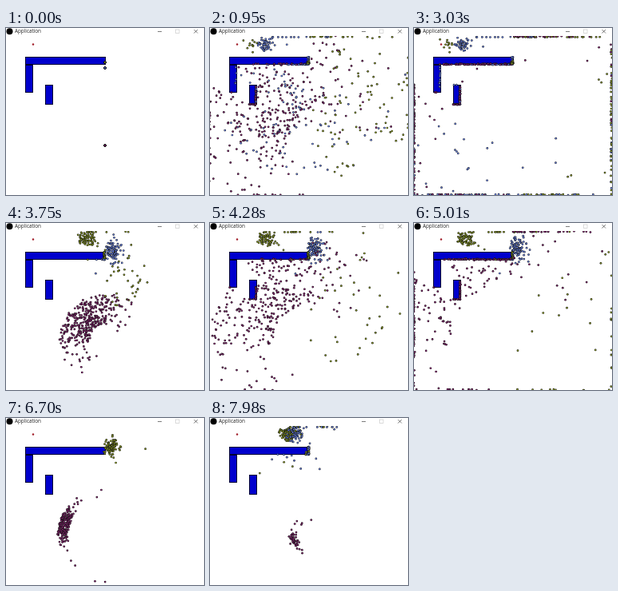
These frames come from a looping animation (248 by 209 pixels, 8000 ms). An HTML page with a canvas:

```html
<!DOCTYPE html>
<html lang="en">
<head>
<meta charset="utf-8">
<title>Application</title>
<style>
  html, body { margin: 0; width: 100%; height: 100%; overflow: hidden; background: #fff; }
  canvas { display: block; }
</style>
</head>
<body>
<canvas id="stage" width="248" height="209"></canvas>
<script>
const ctx = document.getElementById('stage').getContext('2d');
const WIDTH = 248, HEIGHT = 209, LOOP = 8000, TICK = 48, SUBSTEP = 12;
const WALLS = [[24, 36, 101, 10], [24, 46, 10, 35], [49, 71, 10, 25]];
const GOAL = [34, 20];
const PURPLE = { color: '#85246f', spawn: [124, 147] };
const OLIVE = { color: '#8a9a25', spawn: [124, 43] };
const BLUE = { color: '#6c86e8', spawn: [124, 50] };

let seed = 20;
function random() {
  seed = (seed * 1664525 + 1013904223) % 4294967296;
  return seed / 4294967296;
}
const gauss = () => Math.sqrt(-2 * Math.log(1 - random())) * Math.cos(2 * Math.PI * random());
// A few dots stray much further than the rest.
const stray = () => random() < 0.14 ? 3.5 : 1;
const dots = [];

function blocked([x, y]) {
  return x < 0.5 || x > WIDTH - 1.5 || y < 11.5 || y > HEIGHT - 1 ||
    WALLS.some(([wx, wy, w, h]) => x > wx && x < wx + w - 1 && y > wy && y < wy + h);
}

// Adds one dot that sways along its path until it hits something.
function addDot(color, start, end, path) {
  const phase = random() * 2 * Math.PI, rate = 0.004 + random() * 0.006;
  const position = age => {
    const [x, y] = path(age);
    const sway = Math.min(age / 300, 1.5);
    return [x + sway * Math.sin(age * rate + phase), y + sway * Math.cos(age * rate * 1.3 + phase)];
  };
  let stop = SUBSTEP;
  while (stop < end - start && !blocked(position(stop))) stop += SUBSTEP;
  dots.push({ color, start, end, order: random(), at: age => position(Math.min(age, stop)) });
}

// Dots fan out from the spawn around a heading; a narrow fan keeps together.
function scatter({ color, spawn: [x, y] }, { start, end }, count, heading, fan, speed) {
  for (let i = 0; i < count; i++) {
    const angle = heading + gauss() * fan * (fan < 0.5 ? stray() : 1);
    const pace = speed * (1 - Math.min(0.8, fan) * random());
    addDot(color, start, end, age =>
      [x + Math.cos(angle) * pace * age, y + Math.sin(angle) * pace * age]);
  }
}

// A swarm eases round the end of the long wall towards the goal.
function swarm({ color, spawn }, { start, end }, count, reach) {
  const route = [spawn, [134, 33], [100, 20], GOAL];
  for (let i = 0; i < count; i++) {
    const spread = 6 * stray(), dx = gauss() * spread, dy = gauss() * spread;
    addDot(color, start, end, age => {
      const progress = reach * (1 - Math.exp(-age / 300));
      const leg = Math.min(Math.floor(progress), route.length - 2);
      const [a, b] = [route[leg], route[leg + 1]];
      const along = i => a[i] + (b[i] - a[i]) * (progress - leg);
      const grow = Math.min(1, progress);
      return [along(0) + dx * grow, along(1) + dy * grow];
    });
  }
}

const [first, second, third, fourth, fifth] = [0, 3300, 5200, 6250, 7300]
  .map((start, i, starts) => ({ start, end: starts[i + 1] || LOOP }));

scatter(PURPLE, first, 370, 3.95, 0.8, 0.16);
scatter(OLIVE, first, 160, 1.2, 1.3, 0.18);
scatter(BLUE, first, 130, 2.3, 0.9, 0.15);
swarm(OLIVE, first, 14, 2.95);
swarm(BLUE, first, 75, 2.6);

scatter(PURPLE, second, 370, 3.95, 0.65, 0.13);
scatter(OLIVE, second, 80, 1.5, 0.8, 0.14);
swarm(OLIVE, second, 110, 2.55);
swarm(BLUE, second, 110, 1.15);

scatter(PURPLE, third, 290, 3.95, 0.6, 0.2);
swarm(OLIVE, third, 110, 1.1);

scatter(PURPLE, fourth, 220, 3.4, 0.2, 0.14);
swarm(OLIVE, fourth, 100, 1);

scatter(PURPLE, fifth, 50, 2.9, 0.3, 0.036);
swarm(OLIVE, fifth, 120, 2.3);
swarm(BLUE, fifth, 150, 2.1);

dots.sort((a, b) => a.order - b.order);

function circle(x, y, r, color) {
  ctx.fillStyle = color;
  ctx.beginPath();
  ctx.arc(x, y, r, 0, 2 * Math.PI);
  ctx.fill();
}

function line(x1, y1, x2, y2) {
  ctx.beginPath();
  ctx.moveTo(x1, y1);
  ctx.lineTo(x2, y2);
  ctx.stroke();
}

function drawTitleBar() {
  ctx.fillStyle = '#fff';
  ctx.fillRect(0, 0, WIDTH, 10);
  circle(4.5, 4.2, 4, '#000');
  ctx.fillStyle = '#222';
  ctx.font = '6.3px "Open Sans", sans-serif';
  ctx.fillText('Application', 11, 6.2);
  ctx.lineWidth = 0.7;
  ctx.strokeStyle = '#444';
  line(190, 4.5, 195, 4.5);
  line(235.5, 2, 240, 6.5);
  line(240, 2, 235.5, 6.5);
  ctx.strokeStyle = '#ccc';
  ctx.strokeRect(212.5, 2, 4.5, 4.5);
}

function draw(time) {
  ctx.fillStyle = '#fff';
  ctx.fillRect(0, 0, WIDTH, HEIGHT);
  ctx.lineWidth = 1;
  ctx.strokeStyle = '#000030';
  for (const [x, y, w, h] of WALLS) {
    ctx.fillStyle = '#0000cd';
    ctx.fillRect(x, y, w, h);
    ctx.strokeRect(x + 0.5, y + 0.5, w - 1, h - 1);
  }
  circle(GOAL[0], GOAL[1] + 0.5, 1.2, '#a01c28');
  for (const dot of dots) {
    if (time < dot.start || time >= dot.end) continue;
    const [x, y] = dot.at(time - dot.start);
    circle(x, y, 1.35, '#111');
    circle(x, y, 0.9, dot.color);
  }
  drawTitleBar();
}

function frame() {
  const time = performance.now() % LOOP;
  // The first tick is slightly shorter than the others.
  draw(Math.floor((time + 8) / TICK) * TICK);
  requestAnimationFrame(frame);
}
frame();
</script>
</body>
</html>
```
